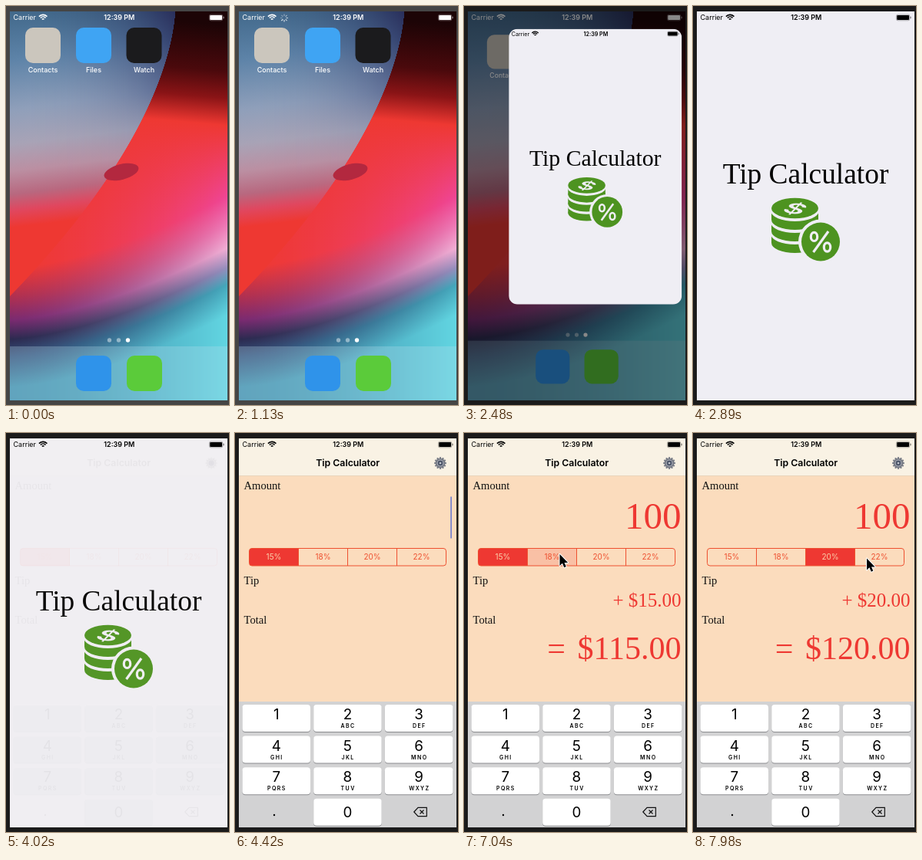
An HTML page with a canvas for the animation above (8 s loop, 290 by 517 pixels).

```html
<!DOCTYPE html>
<html lang="en">
<head>
<meta charset="utf-8">
<title>Tip Calculator</title>
<style>
  html, body { margin: 0; width: 100%; height: 100%; overflow: hidden; background: #1b1b1b; }
  canvas { display: block; width: 100vw; height: 100vh; }
</style>
</head>
<body>
<canvas></canvas>
<script>
const W = 290, H = 517, LOOP = 8000;
const SCREEN = { x: 5, y: 7, w: 283, h: 504 };
const ICON = { x: 222.5, y: 28, size: 46, color: '#3f4a3d' };
const SANS = 'Inter, sans-serif', SERIF = '"Liberation Serif", serif';
const RED = '#ee3832', ORANGE = '#ee5030', PAPER = '#efeef4', GREEN = '#4d9320';

const canvas = document.querySelector('canvas');
const ctx = canvas.getContext('2d');

const clamp = v => Math.max(0, Math.min(1, v));
const ramp = (t, from, to) => clamp((t - from) / (to - from));
const smooth = v => v * v * (3 - 2 * v);
const lerp = (a, b, v) => a + (b - a) * v;
const during = (t, from, to) => t >= from && t < to;

function mix(a, b, v) {
  const channel = (color, i) => parseInt(color.slice(i, i + 2), 16);
  return `rgb(${[1, 3, 5].map(i => Math.round(lerp(channel(a, i), channel(b, i), v)))})`;
}

function rect(x, y, w, h, color) {
  ctx.fillStyle = color;
  ctx.fillRect(x, y, w, h);
}

function roundRect(x, y, w, h, r, color) {
  ctx.beginPath();
  ctx.roundRect(x, y, w, h, r);
  ctx.fillStyle = color;
  ctx.fill();
}

function ellipse(x, y, rx, ry, color) {
  ctx.beginPath();
  ctx.ellipse(x, y, rx, ry, 0, 0, 7);
  ctx.fillStyle = color;
  ctx.fill();
}

function line(x1, y1, x2, y2) {
  ctx.beginPath();
  ctx.moveTo(x1, y1);
  ctx.lineTo(x2, y2);
  ctx.stroke();
}

function text(str, x, y, font, color, align = 'center', spacing = 0) {
  ctx.font = font;
  ctx.fillStyle = color;
  ctx.textAlign = align;
  ctx.letterSpacing = spacing + 'px';
  ctx.fillText(str, x, y);
}

function group(alpha, draw) {
  ctx.save();
  ctx.globalAlpha *= alpha;
  draw();
  ctx.restore();
}

// Each pixel column is a gradient; stops are [y, colour at left, colour at right].
const SKY = [[0, '#1c0406'], [60, '#4a090c'], [95, '#8a1416'], [130, RED]];
const WAVES = [
  [-92, RED, '#ef4596'], [-55, '#b03050', '#f07ab8'], [-25, '#7a2a70', '#f4b0d6'],
  [0, '#2c2a50', '#9a90c0'], [22, '#33507a', '#45a8bc'], [62, '#3f8fac', '#62d6e2']
];
const CLOUD = [
  [0, '#3f6688', '#282c58'], [70, '#5d83a8', '#34416e'], [135, '#8f9fba', '#55658f'],
  [180, '#a8a3b6', '#8790ac'], [215, '#bb8fa2', '#a894a8'], [245, '#b8687f', '#c8687f'],
  [266, '#e0475f', '#e0475f'], [288, RED, RED]
];

function makeWallpaper() {
  const layer = document.createElement('canvas');
  layer.width = W;
  layer.height = H;
  const c = layer.getContext('2d');
  const column = (x, height, stops, blend, shift) => {
    const gradient = c.createLinearGradient(0, 0, 0, H);
    for (const [y, left, right = left] of stops) {
      gradient.addColorStop(clamp((y + shift) / H), mix(left, right, blend));
    }
    c.fillStyle = gradient;
    c.fillRect(x, 0, 1, height);
  };
  for (let x = 0; x < W; x++) {
    const u = x / W;
    const crest = 432 - 95 * u ** 1.6;
    const sky = SKY.map(([y, color]) => [y + 25 * u - crest, color]);
    column(x, H, [...sky, ...WAVES], u ** 1.6, crest);
    const cloudEnd = 210 * (Math.max(0, 220 - x) / 80) ** (1 / 1.7);
    column(x, cloudEnd, CLOUD, clamp(u / 0.75) ** 2.5, -35 * u);
  }
  c.fillStyle = '#b3283f';
  c.beginPath();
  c.ellipse(150, 215, 23, 10, -0.25, 0, 7);
  c.fill();
  return layer;
}
const wallpaper = makeWallpaper();

function statusBar(color) {
  text('Carrier', 9.5, 18.2, `9px ${SANS}`, color, 'left');
  text('12:39 PM', 147.3, 18.2, `600 9px ${SANS}`, color);
  ctx.strokeStyle = color;
  ctx.lineWidth = 1.6;
  for (const r of [7.2, 4.6, 1.8]) {
    ctx.beginPath();
    ctx.arc(48.2, 18.6, r, -Math.PI * 0.76, -Math.PI * 0.24);
    ctx.stroke();
  }
  group(0.5, () => {
    ctx.lineWidth = 0.6;
    ctx.beginPath();
    ctx.roundRect(264.4, 11.2, 17.4, 7.6, 2);
    ctx.stroke();
    roundRect(282.4, 13.6, 1.2, 2.8, 0.6, color);
  });
  roundRect(265.2, 12, 15.8, 6, 1, color);
}

function spinner(t) {
  const lead = Math.floor(t / 90);
  for (let i = 0; i < 8; i++) {
    const angle = i * Math.PI / 4, cos = Math.cos(angle), sin = Math.sin(angle);
    ctx.strokeStyle = `rgba(255,255,255,${0.3 + 0.09 * ((i - lead) & 7)})`;
    ctx.lineWidth = 1.1;
    line(64 + 2.4 * cos, 15.5 + 2.4 * sin, 64 + 5 * cos, 15.5 + 5 * sin);
  }
}

function homeIcon(x, y, color, label) {
  roundRect(x, y, ICON.size, ICON.size, 10, color);
  if (label) text(label, x + 23, y + 58, `500 9px ${SANS}`, '#fff');
}

function home(t, open) {
  ctx.drawImage(wallpaper, 0, 0, W, H);
  group(1, () => {
    const scale = 1 - 0.053 * open;
    ctx.translate(146.5, 259);
    ctx.scale(scale, scale);
    ctx.translate(-146.5, -259);
    rect(-20, 441, 330, 100, 'rgba(190,220,235,.27)');
    homeIcon(25, 28, '#cbc6bd', 'Contacts');
    homeIcon(91, 28, '#3fa4f3', 'Files');
    homeIcon(156.5, 28, '#1b1b1d', 'Watch');
    homeIcon(91, 453, '#2f93ea');
    homeIcon(157, 453, '#5bcb3a');
    const shown = smooth(ramp(t, 1250, 1620));
    group(shown, () => {
      const s = lerp(0.5, 1, shown);
      ctx.translate(245.5, 51);
      ctx.scale(s, s);
      homeIcon(-23, -23, open ? 'transparent' : ICON.color, 'Gritlor');
    });
    for (let i = 0; i < 3; i++) {
      ellipse(134.5 + 12 * i, 433, 2.7, 2.7, i === 2 ? '#fff' : 'rgba(255,255,255,.45)');
    }
  });
  statusBar('#fff');
  if (during(t, 1010, 1790)) spinner(t);
  rect(0, 0, W, H, `rgba(0,0,0,${0.62 * open})`);
}

function coins() {
  for (let k = 3; k > 0; k--) {
    const y = 262 + 15 * k;
    rect(102, y - 11, 61, 11, GREEN);
    ellipse(132.5, y, 30.5, 13, GREEN);
    ellipse(132.5, y - 11, 31, 13, PAPER);
  }
  ellipse(132.5, 262, 30.5, 13.2, GREEN);
  group(1, () => {
    ctx.translate(133, 262.3);
    ctx.scale(1.9, 0.8);
    ctx.rotate(0.4);
    text('$', 0, 8.4, `600 23px ${SANS}`, PAPER);
  });
  ellipse(166, 305.5, 29, 29, PAPER);
  ellipse(166, 305.5, 25, 25, GREEN);
  ctx.strokeStyle = PAPER;
  ctx.lineWidth = 3.2;
  line(176, 292, 156.5, 319);
  for (const side of [-1, 1]) {
    ctx.beginPath();
    ctx.ellipse(166 + 8.5 * side, 305.7 + 6.8 * side, 4.2, 5.6, 0, 0, 7);
    ctx.stroke();
  }
}

function splash() {
  rect(5, 7, 283, 504, PAPER);
  text('Tip Calculator', 146.5, 230, `37.4px ${SERIF}`, '#000');
  coins();
}

function gear() {
  group(1, () => {
    ctx.translate(267, 39);
    for (let i = 0; i < 12; i++) {
      ctx.rotate(Math.PI / 6);
      rect(-1.1, -7.8, 2.2, 3, '#777b85');
    }
    ellipse(0, 0, 6.3, 6.3, '#777b85');
    ellipse(0, 0, 4.4, 4.4, '#b4b8c2');
    ellipse(0, 0, 3.4, 3.4, '#4c5568');
    ellipse(0, 0, 1.3, 1.3, '#c4c7cf');
  });
}

const RATES = [15, 18, 20, 22];
const PICKED_AT = [-1000, 7130, 7680, Infinity];
const PRESSES = [
  { digit: 1, down: 4920, up: 5040 },
  { digit: 0, down: 5700, up: 5820 },
  { digit: 0, down: 5980, up: 6160 }
];

function segments(t) {
  const frame = () => {
    ctx.beginPath();
    ctx.roundRect(18.5, 149.5, 256, 22.5, 3.5);
  };
  const picked = i => i < 3 ? ramp(t, PICKED_AT[i], PICKED_AT[i] + 120) : 0;
  ctx.strokeStyle = ORANGE;
  ctx.lineWidth = 1;
  RATES.forEach((rate, i) => {
    const x = 18.5 + 64 * i;
    const chosen = picked(i) - picked(i + 1);
    const touched = during(t, PICKED_AT[i] - 120, PICKED_AT[i]);
    group(touched ? 0.17 : chosen, () => {
      frame();
      ctx.clip();
      rect(x, 149, 64, 24, RED);
    });
    text(rate + '%', x + 32, 164.4, `10px ${SANS}`, chosen > 0.5 ? '#fbd0ab' : ORANGE);
    if (i) line(x, 149.5, x, 172);
  });
  frame();
  ctx.stroke();
}

function keyboard(t) {
  rect(5, 348, 283, 163, '#d2d2d3');
  const key = (digit, col, row, sub) => {
    const x = 9.5 + 92.7 * col, y = 352 + 40.6 * row, mid = x + 44.2;
    const held = PRESSES.some(p => p.digit === digit && during(t, p.down, p.up));
    roundRect(x, y + 1, 88.5, 35, 4, '#8b8c8f');
    roundRect(x, y, 88.5, 35, 4, held ? '#bcbec3' : '#fff');
    text(digit, mid, y + (digit ? 19 : 24.2), `18.8px ${SANS}`, '#000');
    if (sub) text(sub, mid + 0.7, y + 30, `600 7px ${SANS}`, '#000', 'center', 1.4);
  };
  ['', 'ABC', 'DEF', 'GHI', 'JKL', 'MNO', 'PQRS', 'TUV', 'WXYZ']
    .forEach((sub, i) => key(i + 1, i % 3, Math.floor(i / 3), sub));
  key(0, 1, 3);
  ellipse(51, 495, 1.2, 1.2, '#000');
  ctx.strokeStyle = '#111';
  ctx.lineWidth = 1.2;
  ctx.stroke(new Path2D('M232.8 491l5.2-5.7h11.3v11.4H238zM240.5 488.5l5 5m0-5l-5 5'));
}

function calculator(t) {
  rect(5, 7, 283, 504, '#fbdcbd');
  rect(5, 7, 283, 48, '#f9f2e4');
  rect(5, 55, 283, 0.5, '#d9cbb8');
  text('Tip Calculator', 146.7, 43.3, `600 12.3px ${SANS}`, '#000');
  gear();
  text('Amount', 11.5, 73, `14.6px ${SERIF}`, '#111', 'left');
  text('Tip', 11.5, 195.5, `14.6px ${SERIF}`, '#111', 'left');
  text('Total', 11.5, 247, `14.6px ${SERIF}`, '#111', 'left');
  segments(t);

  const amount = Number(PRESSES.filter(p => t >= p.up).map(p => p.digit).join(''));
  const rate = RATES[PICKED_AT.findLastIndex(at => t >= at)];
  if (amount) {
    const tip = amount * rate / 100;
    text(amount, 282.5, 124, `49px ${SERIF}`, RED, 'right');
    text('+ $' + tip.toFixed(2), 282.5, 225, `25px ${SERIF}`, RED, 'right');
    ctx.wordSpacing = '5px';
    text('= $' + (amount + tip).toFixed(2), 282.5, 292.5, `42px ${SERIF}`, RED, 'right');
    ctx.wordSpacing = '0px';
  }
  const blink = t % 1000;
  group(ramp(blink, 240, 380) - ramp(blink, 720, 860), () =>
    rect(280.3, 82.5, 1.5, 54, '#6274cf'));
  keyboard(t);
}

function appView(t) {
  const ready = ramp(t, 4010, 4300);
  if (ready < 1) splash();
  if (ready > 0) group(ready, () => calculator(t));
  statusBar('#000');
}

// The app grows out of its icon, scaled by width and cropped below.
function launchingApp(t, open) {
  const x = lerp(ICON.x, SCREEN.x, open), w = lerp(ICON.size, SCREEN.w, open);
  const h = lerp(ICON.size, SCREEN.h, open ** 1.38);
  const y = lerp(51, 259, open) - h / 2;
  const scale = w / SCREEN.w;
  group(1, () => {
    ctx.beginPath();
    ctx.roundRect(x, y, w, h, lerp(10, 15, open) * (1 - open ** 6));
    ctx.clip();
    group(1, () => {
      ctx.translate(x, y);
      ctx.scale(scale, scale);
      ctx.translate(-SCREEN.x, -SCREEN.y);
      appView(t);
    });
    group(1 - ramp(open, 0, 0.4), () => rect(x, y, w, h, ICON.color));
  });
}

const GLIDES = [
  { from: 4600, to: 4880, x: 52, y: 366 },
  { from: 5120, to: 5680, x: 143, y: 484 },
  { from: 6400, to: 6980, x: 124.5, y: 157 },
  { from: 7280, to: 7540, x: 188, y: 160 },
  { from: 7700, to: 7960, x: 226, y: 162.5 }
];
const ARROW = new Path2D('M0 0v15l3.4-3.2 2.4 5.4 2.5-1.1-2.3-5.2h4.6z');

function pointer(t) {
  if (t < GLIDES[0].from) return;
  let x = 22, y = 490;
  for (const glide of GLIDES) {
    const v = smooth(ramp(t, glide.from, glide.to));
    x = lerp(x, glide.x, v);
    y = lerp(y, glide.y, v);
  }
  group(1, () => {
    ctx.translate(x, y);
    ctx.lineJoin = 'round';
    ctx.strokeStyle = '#fff';
    ctx.lineWidth = 2;
    ctx.stroke(ARROW);
    ctx.fillStyle = '#000';
    ctx.fill(ARROW);
  });
}

function draw(t) {
  rect(0, 0, W, H, t < 1850 ? '#454545' : '#1b1b1b');
  const open = smooth(1 - (1 - ramp(t, 2020, 2890)) ** 1.5);
  group(1, () => {
    ctx.beginPath();
    ctx.rect(SCREEN.x, SCREEN.y, SCREEN.w, SCREEN.h);
    ctx.clip();
    if (open < 1) home(t, open);
    if (open === 1) appView(t);
    else if (open > 0) launchingApp(t, open);
    pointer(t);
  });
}

const start = performance.now();

function frame() {
  const ratio = devicePixelRatio || 1;
  const w = Math.round(innerWidth * ratio), h = Math.round(innerHeight * ratio);
  if (canvas.width !== w || canvas.height !== h) {
    canvas.width = w;
    canvas.height = h;
  }
  ctx.setTransform(w / W, 0, 0, h / H, 0, 0);
  draw((performance.now() - start) % LOOP);
  requestAnimationFrame(frame);
}
frame();
</script>
</body>
</html>
```
